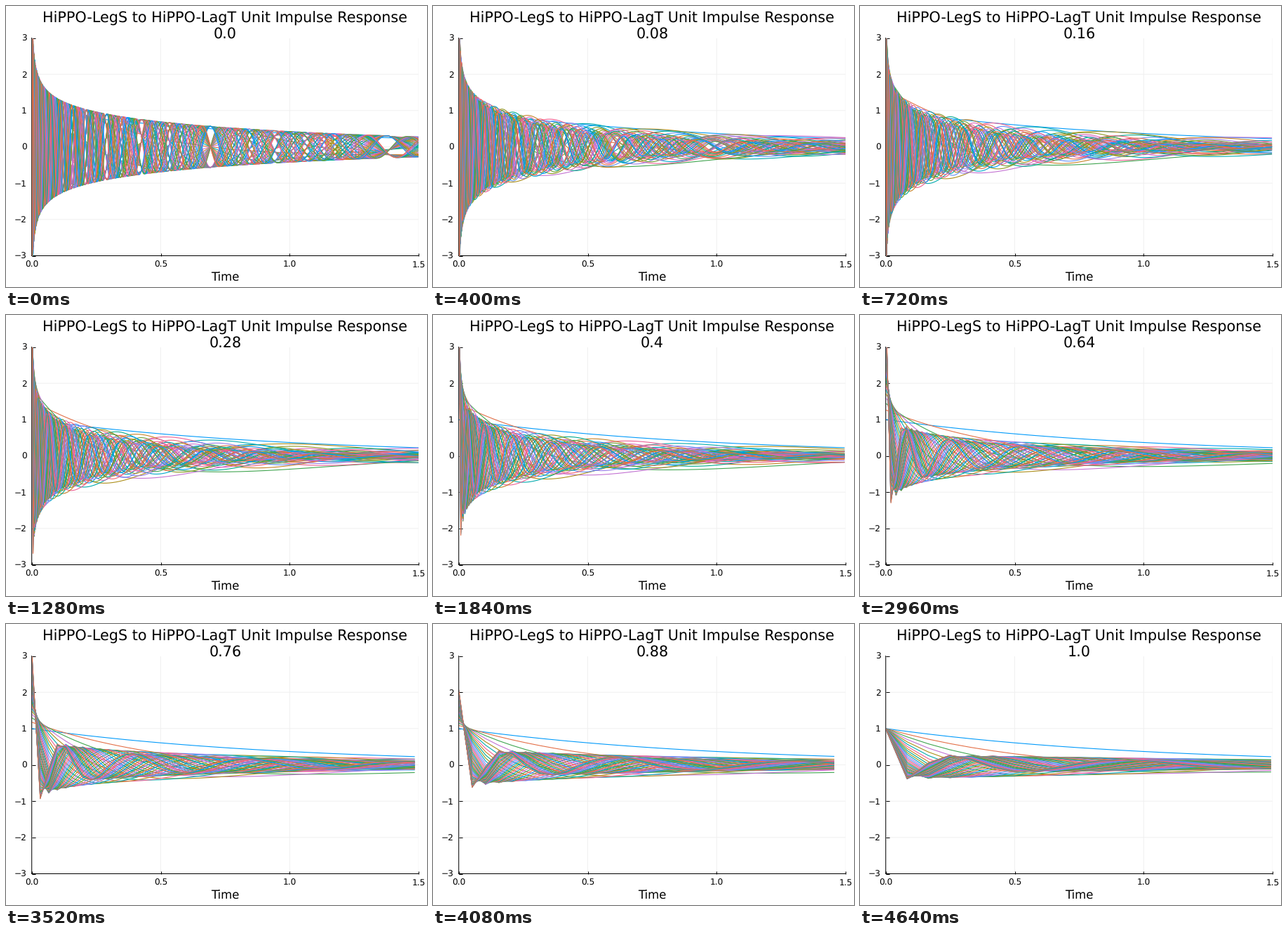
Animation of 600x400 px, one loop 4660 ms. Source, as a matplotlib script:

```python
import numpy as np
import matplotlib
import matplotlib.pyplot as plt
from matplotlib.animation import FuncAnimation

matplotlib.rcParams["font.family"] = "DejaVu Sans"
matplotlib.rcParams["text.hinting"] = "none"

W, H, DPI = 600, 400, 100
PX = 72 / DPI                  # one pixel in points
STATES = 50
T_END = 1.5
STEPS = 100                    # blend goes from 0 to 1 in hundredths
TICK = 20                      # ms
LOOP = 4660                    # ms
LEFT, RIGHT, TOP, BOTTOM = 36.7, 588.1, 45.5, 355.5

PALETTE = [
    "#009AFA", "#E36F47", "#3EA44E", "#C371D2", "#AC8E18", "#00AAAE",
    "#ED5E93", "#C68225", "#00A98D", "#8E971E", "#00A8CB", "#9B7FE9",
    "#618DF6", "#F06073", "#DD65B6", "#6C9F33",
]


def expm(m):
    """Matrix exponential by scaling, Taylor series and squaring."""
    squarings = max(0, int(np.ceil(np.log2(np.abs(m).sum(axis=1).max()))) + 1)
    m = m / 2 ** squarings
    term = total = np.eye(len(m))
    for j in range(1, 16):
        term = term @ m / j
        total = total + term
    for _ in range(squarings):
        total = total @ total
    return total


def blended_system(mix):
    """A is blended geometrically per entry, B linearly: LegS at 0, LagT at 1."""
    n = np.arange(STATES)
    p = 1 - mix
    scale = np.sqrt(2 * n + 1)
    a = -np.tril(np.outer(scale, scale) ** p, -1) - np.diag((n + 1.0) ** p)
    b = p * scale + mix
    return a, b


def impulse_response(mix):
    a, b = blended_system(mix)
    fastest = np.abs(np.diag(a)).max()
    dt = float(f"{1 / (12 * fastest):.2g}")
    count = int(T_END / dt + 1e-9) + 1
    step = expm(a * dt)
    x = np.empty((count, STATES))
    x[0] = b
    for i in range(1, count):
        x[i] = step @ x[i - 1]
    return dt * np.arange(count), x


def step_at(ms):
    """Steps come in threes that last 20, 100 and 20 ms."""
    group, rest = divmod(ms, 140)
    return min(3 * group + (rest >= 20) + (rest >= 120), STEPS)


responses = [impulse_response(k / STEPS) for k in range(STEPS + 1)]

fig = plt.figure(figsize=(W / DPI, H / DPI), dpi=DPI, facecolor="white")
ax = fig.add_axes([LEFT / W, 1 - BOTTOM / H,
                   (RIGHT - LEFT) / W, (BOTTOM - TOP) / H])
ax.set_xlim(0, T_END)
ax.set_ylim(-3, 3)
ax.set_xticks([0, 0.5, 1, 1.5], ["0.0", "0.5", "1.0", "1.5"])
ax.set_yticks(range(-3, 4))
ax.set_axisbelow(True)
ax.grid(color="#f0f0f0", linewidth=PX, snap=False)
ax.tick_params(direction="in", length=4.5 * PX, width=PX, labelsize=12.1 * PX)
ax.tick_params(axis="x", pad=7.1 * PX)
ax.tick_params(axis="y", pad=7.1 * PX)
for mark in ax.xaxis.get_ticklines() + ax.yaxis.get_ticklines():
    mark.set_snap(False)
for side, spine in ax.spines.items():
    spine.set_visible(side in ("left", "bottom"))
    spine.set_linewidth(PX)
    spine.set_zorder(0.6)
    spine.set_snap(False)


def centered_text(baseline, text, size):
    return fig.text((LEFT + RIGHT) / 2 / W, 1 - baseline / H, text,
                    ha="center", va="baseline", fontsize=size * PX)


centered_text(23.6, "HiPPO-LegS to HiPPO-LagT Unit Impulse Response", 20.77)
mix_label = centered_text(46.2, "", 20.77)
centered_text(392, "Time", 16.5)

lines = [ax.plot([], [], color=PALETTE[i % len(PALETTE)], linewidth=1.1 * PX,
                 solid_capstyle="butt")[0] for i in range(STATES)]


def update(frame):
    k = step_at(frame * TICK)
    t, x = responses[k]
    mix_label.set_text(str(k / STEPS))
    for i, line in enumerate(lines):
        line.set_data(t, x[:, i])
    return lines + [mix_label]


anim = FuncAnimation(fig, update, frames=LOOP // TICK, interval=TICK,
                     repeat=True, repeat_delay=0, blit=False)
plt.show()
```
